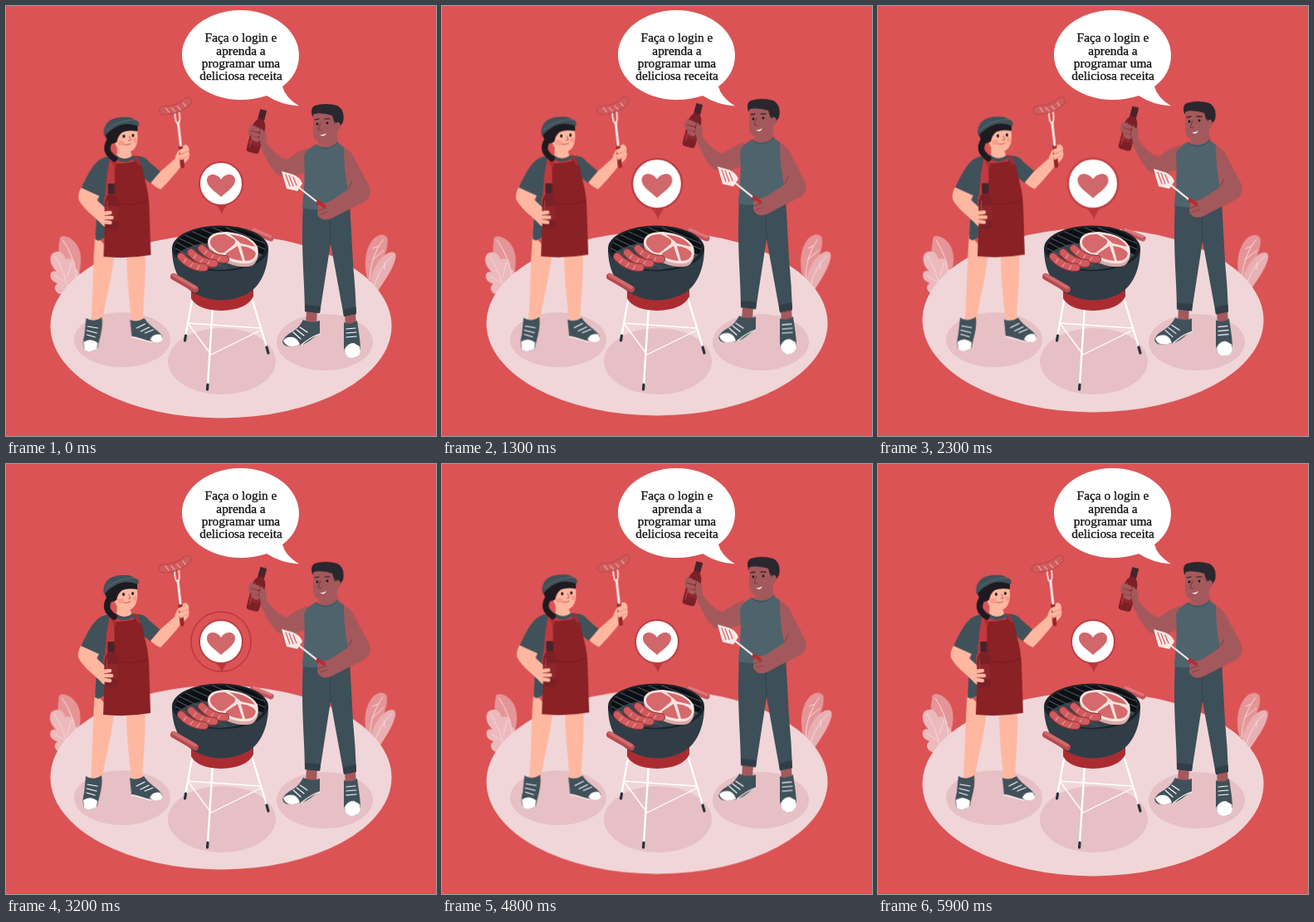
Animation, 518 px wide and 518 px high, one loop 6 s. Source, as an HTML page:

```html
<!DOCTYPE html>
<html lang="pt">
<head>
<meta charset="utf-8">
<title>Churrasco</title>
<style>
html, body { margin: 0; width: 100%; height: 100%; overflow: hidden; background: #db5354; }
svg { display: block; width: 100vw; height: 100vh; }
text { font: 15.4px "Liberation Serif", serif; text-anchor: middle; fill: #111; stroke: #111; stroke-width: .3; }

.slate { fill: #40515a; }
.skinA { fill: #ffb7a0; }
.skinB { fill: #a3595c; }
.ink { fill: #1e1a20; }
.white { fill: #fff; }
.line { fill: none; stroke-linecap: round; stroke-linejoin: round; }

.floor { animation: floor 3s ease-in-out infinite alternate; }
.woman { animation: sway 3s -2.6s ease-in-out infinite; }
.man { transform-origin: 390px 424px; animation: bob 3s ease-in-out infinite; }
.raise { animation: raise 3s ease-in-out infinite; }
.leafL { transform-origin: 78px 345px; animation: leanL 3s -.6s ease-in-out infinite; }
.leafR { transform-origin: 442px 335px; animation: leanR 3s -.6s ease-in-out infinite; }
.pin, .heart, .wave { transform-origin: 259px 214px; }
.pin { animation: pin 6s linear infinite; }
.heart { animation: heart 6s linear infinite; }
.wave { animation: wave 6s linear infinite; }

@keyframes floor { to { transform: translateY(-8px); } }
@keyframes sway { 0%, 100% { transform: translate(-1px, 0); } 50% { transform: translate(2.3px, -.7px); } }
@keyframes bob { 0%, 100% { transform: none; } 52% { transform: translateY(-5px) scaleY(1.005); } }
@keyframes raise { 0%, 100% { transform: none; } 48% { transform: translateY(-1px); } }
@keyframes leanL { 0%, 100% { transform: rotate(1deg); } 50% { transform: rotate(-3deg); } }
@keyframes leanR { 0%, 100% { transform: rotate(1.5deg); } 50% { transform: rotate(-2deg); } }
@keyframes pin {
  0%, 15% { transform: none; }
  22%, 40% { transform: scale(1.16); }
  50%, 100% { transform: none; }
}
@keyframes heart {
  0%, 15% { transform: none; }
  22%, 40% { transform: scale(1.09); }
  50%, 100% { transform: none; }
}
@keyframes wave {
  0%, 40% { transform: scale(.83); opacity: 0; }
  44% { transform: scale(.9); opacity: .9; }
  53.3% { transform: none; opacity: .85; }
  58%, 100% { transform: scale(1.07); opacity: 0; }
}
</style>
</head>
<body>
<svg viewBox="0 0 518 518">
  <defs>
    <g id="beer">
      <path fill="#7b2027" d="M-4-27H4L4-14Q8-9 8-3V24Q8 28 4 28H-4Q-8 28-8 24V-3Q-8-9-4-14Z"/>
      <path fill="#46242c" d="M-4-27H4V-15H-4Z"/>
      <path fill="#8f262b" d="M-8 0H8V18H-8Z"/>
      <path class="line" stroke="#a9484c" d="M-5-6V22"/>
    </g>
    <g id="link">
      <path class="line" stroke="#b04347" stroke-width="10.500" d="M-15 6Q3 6 14-5"/>
      <path class="line" stroke="#d05a5c" stroke-width="9" d="M-15 6Q3 6 14-5"/>
      <path class="line" stroke="#eda19d" stroke-width="1.300" d="M-12 3L-8 8M-5 3L-1 7M2 1L6 5M9-3L12 1"/>
    </g>
    <g id="grilled" class="line">
      <path stroke="#8e3439" stroke-width="10" d="M-14-7Q-2 6 14 6"/>
      <path stroke="#d05a5d" stroke-width="8" d="M-14-7Q-2 6 14 6"/>
      <path stroke="#eda19d" stroke-width="1.200" d="M-8-4L-11 0M0 1L-3 5M8 4L5 8"/>
    </g>
  </defs>

  <g class="leafL">
    <path fill="#e59597" d="M65 283Q64 277 70 277C83 279 93 293 90 312Q89 322 84 332L74 320C64 306 62 295 65 283Z"/>
    <path fill="#ecb9bc" d="M56 298C64 293 70 297 72 305C80 302 85 308 83 316C89 318 91 325 86 332L77 347C70 348 63 348 60 343Q57 338 62 334Q52 331 54 322Q56 318 61 320C55 314 51 305 56 298Z"/>
    <path class="line" stroke="#f6d9da" d="M69 282Q84 304 85 330M59 301Q70 318 76 345M59 325L72 333M79 309L74 326"/>
  </g>
  <g class="leafR">
    <path fill="#e59597" d="M436 330C430 313 432 290 444 279Q454 272 459 279C462 291 452 309 442 331Z"/>
    <path fill="#e9b0b3" d="M438 335C441 317 449 303 461 297Q471 294 469 304C466 317 456 331 448 343Z"/>
    <path class="line" stroke="#f6d9da" d="M454 281Q439 301 438 329M465 301Q451 313 443 338M449 289L442 292M455 294L441 306M456 309L456 317"/>
  </g>

  <ellipse class="floor" cx="259" cy="385.500" rx="205.500" ry="111" fill="#f0d6d8"/>
  <g fill="#e6c0c4">
    <ellipse cx="140" cy="402" rx="58" ry="33"/>
    <ellipse cx="260" cy="428" rx="65" ry="40"/>
    <ellipse cx="384" cy="405" rx="58" ry="34"/>
  </g>

  <g class="woman">
    <path class="skinA" d="M108 276C105 312 106 335 103 380L117 382C118 362 126 340 131 300ZM146 298C146 330 149 350 152 382L166 381C164 364 170 335 168 296Z"/>
    <g class="slate">
      <path d="M97 376Q106 382 116 375C118 389 113 400 111 412Q103 419 95 414Q92 406 95 396Z"/>
      <path d="M150 378Q158 382 167 376C173 386 184 390 189 398Q190 405 178 404C168 404 161 398 152 398Z"/>
    </g>
    <path class="white" d="M94 405Q102 399 111 406L110 413Q102 419 95 414ZM174 402Q178 394 187 396Q192 403 185 405Q178 406 174 402Z"/>
    <path class="line" stroke="#fff" stroke-width="1.200" d="M99 386L111 388M98 391L110 394M98 396L108 399M158 388L168 383M163 392L173 387M168 394L178 390M152 399Q162 401 175 405"/>

    <path class="slate" d="M112 228L134 235L150 262L112 283L108 281L110 248Z"/>
    <path fill="#c23a3e" d="M122 183Q142 178 158 182L165 196L160 240L118 240Z"/>
    <path class="skinA" d="M135 166L150 174L153 183Q143 191 134 183Z"/>
    <path class="line" stroke="#40515a" stroke-width="4" d="M133 182Q143 190 154 182"/>
    <path class="slate" d="M126 181C110 183 104 192 91 220Q100 228 113 230L120 230L122 204ZM153 181Q167 179 173 188L187 200Q183 208 175 214L160 202Z"/>
    <path fill="#892125" d="M131 190Q148 190 160 186L165 195C167 210 172 219 173 240L175 300Q146 305 118 302L120 250C133 235 132 212 131 190Z"/>
    <path class="line" stroke="#a92c30" stroke-width="3.500" d="M128 183L132 193M157 182L161 190"/>
    <path class="line" stroke="#7a191d" stroke-width="1" d="M135 238Q153 242 172 235"/>

    <path class="skinA" d="M175 213L186 200L204 184C206 176 212 168 217 167Q222 169 221 176Q223 183 217 188C210 193 207 201 187 221Q181 219 175 213Z"/>
    <path class="line" stroke="#9c2429" stroke-width="5" d="M211 170L213 193"/>
    <path class="line" stroke="#f6e7e6" stroke-width="3" d="M211 168L208 141"/>
    <path class="line" stroke="#f6e7e6" stroke-width="1.800" d="M204 128Q204 141 208 142Q211 139 209 127"/>
    <path class="skinA" d="M208 174L219 169Q222 172 219 175L211 179ZM208 180L220 176Q223 179 220 182L211 186Z"/>
    <path class="line" stroke="#e98d7b" stroke-width=".800" d="M210 179L220 175M211 185L220 181"/>
    <use href="#link" x="205" y="120"/>

    <path class="skinA" d="M91 219L113 229L110 234L123 246L132 250L130 262Q121 271 114 261C104 251 93 244 88 233Q87 226 91 219Z"/>
    <use href="#beer" transform="translate(127.500 241)"/>
    <path class="line" stroke="#ffb7a0" stroke-width="4.500" d="M118 250L126 249M118 255L128 255M119 260L126 261"/>

    <path class="line" stroke="#1e1a20" stroke-width="7.500" d="M127 160Q120 170 124 177Q128 182 131 184"/>
    <path class="skinA" d="M131 153Q145 141 158 146C160 157 160 169 153 174Q146 179 138 174C132 170 130 163 131 153Z"/>
    <path class="ink" d="M120 156Q124 146 138 141L159 141L159 151Q148 149 141 152Q136 155 134 164Q127 168 123 164Z"/>
    <path class="slate" d="M119 157C116 143 126 134 140 134Q151 133 155 137Q163 139 160 145Q150 141 140 143Q129 146 119 157Z"/>
    <path class="line" stroke="#5b6c75" stroke-width="1" d="M121 150Q133 138 155 137"/>
    <ellipse cx="139" cy="165" rx="4" ry="3" fill="#fb9a8d"/>
    <ellipse cx="156" cy="162" rx="2.500" ry="3" fill="#fb9a8d"/>
    <ellipse class="ink" cx="142.500" cy="157" rx="1.500" ry="2"/>
    <ellipse class="ink" cx="153.500" cy="156" rx="1.500" ry="2"/>
    <path class="line" stroke="#c25c50" d="M149 157L151 162L148 162M143 167Q147 168 151 166"/>
  </g>

  <g class="man">
    <path class="skinB" d="M362 366H375L374 384H361ZM408 370H421L422 386H409Z"/>
    <g class="slate">
      <path d="M358 378Q368 383 378 379L378 395C370 398 363 409 350 409Q335 413 333 404Q336 397 344 393Q353 388 358 378Z"/>
      <path d="M407 381Q415 385 423 379C425 394 427 403 427 415Q425 425 416 424Q408 423 407 411Z"/>
    </g>
    <path class="white" d="M334 403Q338 398 346 399Q352 401 354 408Q338 414 334 403ZM408 414Q411 406 419 406L426 410L427 416Q425 425 415 424Q408 422 408 414Z"/>
    <path class="line" stroke="#fff" stroke-width="1.200" d="M354 387L363 393M350 390L359 397M346 393L355 401M410 389L421 388M410 394L422 393M410 399L422 398M378 395Q368 398 356 408"/>
    <path fill="#3d4f58" d="M358 238L414 236L418 310Q421 340 422 371L407 374L391 286L378 370L360 368C360 330 355 298 358 238Z"/>
    <path fill="#2f3e47" d="M360 360L379 362L378 370L360 368ZM406 366L421.500 362L422 371L407 374Z"/>
    <path class="line" stroke="#34454e" stroke-width="1.200" d="M390 258L391 287"/>

    <g class="raise">
      <path class="skinB" d="M364 171Q351 175 338 185C329 182 320 174 313 163Q312 151 306 143L298 142Q291 146 292 154L304 165C311 178 316 192 326 202Q338 210 363 199Z"/>
      <use href="#beer" transform="translate(303.500 150.500) rotate(15) scale(.98 .970)"/>
      <path class="skinB" d="M295 143L305 147Q308 150 304 152L293 149ZM293 150L304 153Q307 156 303 158L293 155ZM295 156L305 159Q307 163 302 164L297 162ZM307 147L314 154L313 167L307 167L305 158Z"/>
    </g>
    <path fill="#4f636c" d="M373 167Q385 174 399 164L408 171Q411 190 414 242Q387 248 357 244C358 228 361 212 359 181Q362 172 373 167Z"/>
    <path class="skinB" d="M378 158L399 147Q398 158 400 164Q388 174 376 167Z"/>
    <path class="line" stroke="#40525b" stroke-width="1" d="M373 167Q387 178 400 164"/>

    <path fill="#2a272e" d="M369 133Q366 123 372 120Q385 116 399 120Q409 125 406 140L399 150L390 139Z"/>
    <path class="skinB" d="M370 131Q379 125 394 129L397 142Q400 137 403 143Q402 152 396 151C395 159 389 165 379 164Q370 161 370 153Z"/>
    <path fill="#2a272e" d="M369 129Q383 123 396 128L396 142L393 132Q382 128 369 130Z"/>
    <circle class="ink" cx="375" cy="142" r="1.500"/>
    <circle class="ink" cx="387" cy="141" r="1.500"/>
    <path class="line" stroke="#281d23" stroke-width="1.200" d="M372 137L377 136M384 136L390 136"/>
    <path class="line" stroke="#713e43" d="M379 141L376 149L380 150"/>
    <path class="white" d="M378 155Q382 156 386 153Q383 159 378 155Z"/>

    <path class="line" stroke="#f7e9e8" stroke-width="2.200" d="M352 218L376 237"/>
    <path fill="#f7e9e8" d="M332 199L346 203Q355 207 357 214L351 223L338 220Z"/>
    <path class="line" stroke="#db5354" stroke-width="1.100" d="M337 203L342 217M341 204L346 217M346 206L350 216"/>
    <path class="line" stroke="#b72c31" stroke-width="5" d="M376 237L384 244"/>
    <path class="skinB" d="M407 171Q417 174 422 188L438 218Q441 229 433 235C420 242 406 248 394 255Q383 260 378 255Q373 251 376 246Q373 242 378 239L391 235L412 221Q407 198 407 171Z"/>
    <path class="line" stroke="#824248" stroke-width="1" d="M377 246L386 243M378 251L387 248M413 219L417 211"/>
    <path class="line" stroke="#b72c31" stroke-width="4" d="M376 236L383 241"/>
  </g>

  <g>
    <path class="line" stroke="#fff" stroke-width="2.400" d="M224 355L216 399M249 362L243 457M294 345L315 414"/>
    <path class="line" stroke="#fff" stroke-width="1.300" d="M219 382L306 388M219 382L247 420L308 390"/>
    <path class="line" stroke="#29333b" stroke-width="3.200" d="M216.500 397L215.500 403M243 456L242.500 462M314 411L316 418"/>
    <path fill="#aa2c31" d="M223 338H298V350Q290 366 259 367Q230 366 223 352Z"/>
    <path class="line" stroke="#c5565a" stroke-width="7" d="M297 271L319 280"/>
    <path class="line" stroke="#dd7779" stroke-width="3" d="M298 269L319 278"/>
    <path fill="#303d46" d="M200 292H316C316 318 306 340 288 348Q259 361 231 348C210 338 200 318 200 292Z"/>
    <ellipse cx="258" cy="292" rx="58" ry="27.500" fill="#1b2329"/>
    <ellipse cx="258" cy="291" rx="54" ry="24" fill="#0c0f13"/>
    <path fill="#35434c" d="M206 298Q229 282 257 286Q287 292 309 299Q299 315 258 318Q219 316 206 298Z"/>
    <path class="line" stroke="#4b565e" stroke-width="1.100" d="M206 285L265 316M209 280L279 314M216 276L291 311M225 272L301 306M236 269L308 301M249 267L312 293M265 267L312 286M204 292L247 315"/>
    <path class="line" stroke="#b74b50" stroke-width="8" d="M202 326L228 341"/>
    <path class="line" stroke="#d06a6d" stroke-width="4" d="M202 324L228 339"/>

    <path fill="#d9a9a8" d="M243 286Q244 276 266 275Q295 277 303 293Q306 307 296 313Q287 316 273 312Q257 307 249 298Q243 293 243 286Z"/>
    <path fill="#f8e3df" d="M243 283Q245 272 266 272Q295 275 303 290Q306 303 296 309Q287 312 273 308Q257 303 249 294Q243 289 243 283Z"/>
    <path fill="#d5696c" d="M246 283Q249 274 264 275L275 281Q278 285 274 288L263 297Q257 299 252 294Q245 289 246 283ZM270 275Q293 278 300 290L283 286ZM265 298L279 289L285 307Q273 306 265 301ZM283 289Q298 291 301 298Q300 307 288 307Z"/>

    <use href="#grilled" x="250" y="299"/>
    <use href="#grilled" x="237" y="304"/>
    <use href="#grilled" x="225" y="309"/>
  </g>

  <circle class="wave line" cx="259" cy="214" r="36" stroke="#b73338" stroke-width="1.500"/>
  <g class="pin">
    <path fill="#b9363c" d="M248 236H270Q263 242 260 251Q257 242 248 236Z"/>
    <circle cx="259" cy="214" r="26" fill="#fff" stroke="#bd3d42" stroke-width="2"/>
  </g>
  <path class="heart" fill="#d0676b" d="M259 230C253 224 242 218 242 210C242 201 254 201 259 209C264 201 276 201 276 210C276 218 265 224 259 230Z"/>

  <path class="white" d="M353 59C353 29 321 5 282.500 5S212 29 212 59S244 113 282.500 113Q299 113 314 108Q331 119 353 120.500Q336 110 333 97Q353 82 353 59Z"/>
  <text x="283" y="43">Faça o login e</text>
  <text x="283" y="58.500">aprenda a</text>
  <text x="283" y="74">programar uma</text>
  <text x="283" y="89">deliciosa receita</text>
</svg>
</body>
</html>
```
